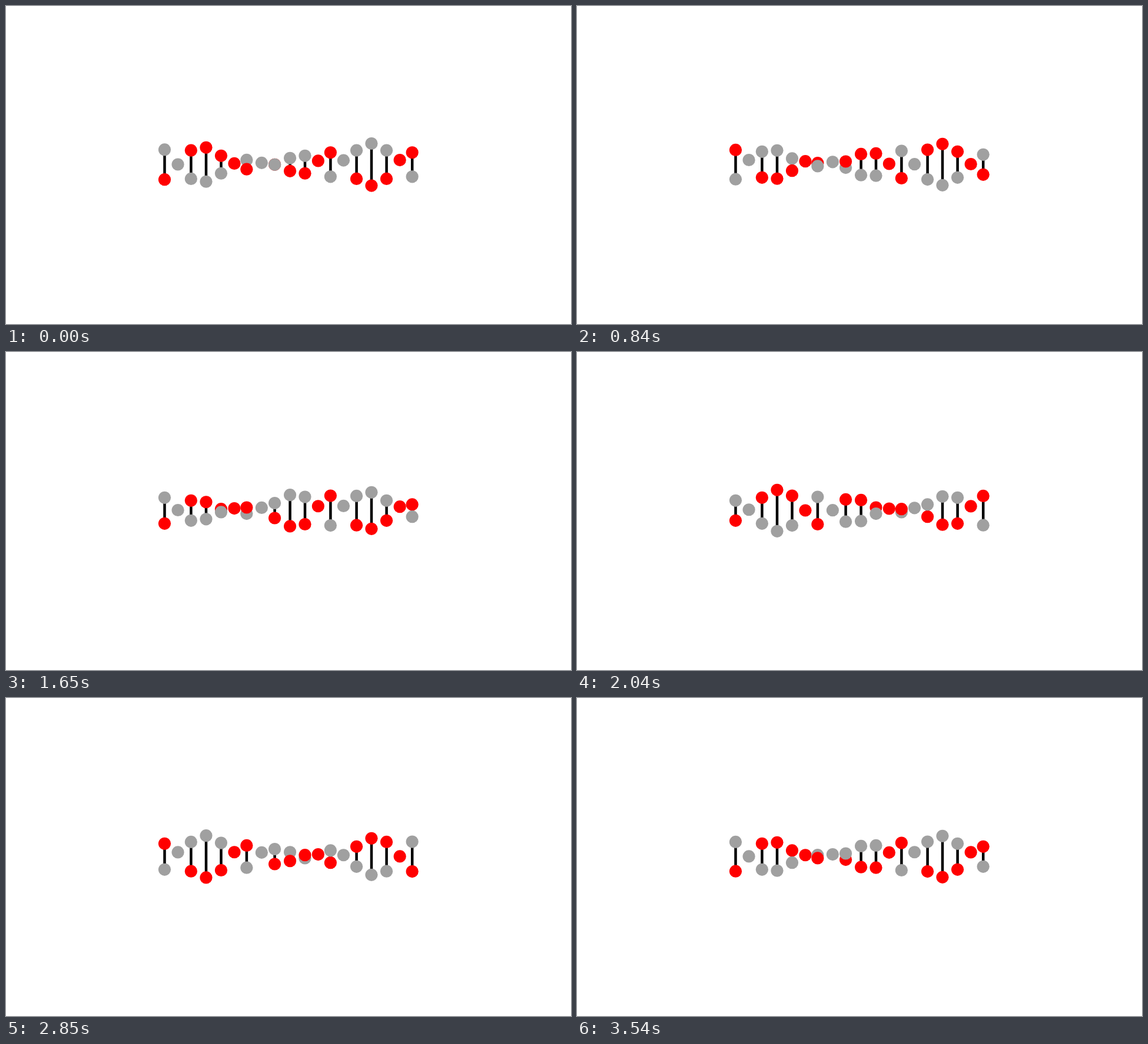
Write an HTML page with a canvas that moves like this. It is 960 px wide and 540 px high and loops after 3.57 s.

```html
<!DOCTYPE html>
<html lang="en">
<head>
<meta charset="utf-8">
<title>Helix</title>
<style>
  html, body { margin: 0; width: 100%; height: 100%; overflow: hidden; background: #fff; }
  canvas { display: block; }
</style>
</head>
<body>
<canvas width="960" height="540"></canvas>
<script>
const ctx = document.querySelector('canvas').getContext('2d');
const RED = '#f00', GRAY = '#a0a0a0';
const LOOP = 3570, STEP = 30, TURN = 1800;
const CENTER_Y = 269.3, RADIUS = 10.6;
const COLUMNS = [269.5, 292.1, 314.4, 340, 365.5, 388, 408.9, 434.4, 456.6, 482.6,
  508, 530.4, 551.4, 573.5, 595.6, 621, 646.6, 669.2, 690.2];

// Repeating run of six columns; lag counts tenths of a half turn.
const PATTERN = [
  { lag: 0, reach: -25.4 },
  { lag: 0, single: GRAY },
  { lag: 1, reach: 25.4 },
  { lag: 2, reach: 35.8 },
  { lag: 3, reach: 25.4 },
  { lag: 3, single: RED },
];

function dot(x, y, color) {
  ctx.fillStyle = color;
  ctx.beginPath();
  ctx.arc(x, y, RADIUS, 0, Math.PI * 2);
  ctx.fill();
}

function drawColumn(x, i, turn) {
  const { lag, reach, single } = PATTERN[i % 6];
  const angle = turn - (lag + 4 * Math.floor(i / 6)) * Math.PI / 10;
  if (single) {
    dot(x, 265.2 + 3.8 * Math.cos(angle), single);
    return;
  }
  const rise = reach * Math.cos(angle);
  ctx.fillStyle = '#000';
  ctx.fillRect(x - 2.25, CENTER_Y - Math.abs(rise), 4.5, 2 * Math.abs(rise));

  const dots = [[CENTER_Y + rise, GRAY], [CENTER_Y - rise, RED]];
  const redInFront = reach * Math.sin(angle) > 1e-6;
  if (!redInFront) dots.reverse();
  for (const [y, color] of dots) dot(x, y, color);
}

function draw() {
  const time = Math.floor(performance.now() % LOOP / STEP) * STEP;
  const turn = time / TURN * Math.PI * 2;
  ctx.clearRect(0, 0, 960, 540);
  COLUMNS.forEach((x, i) => drawColumn(x, i, turn));
  requestAnimationFrame(draw);
}
draw();
</script>
</body>
</html>
```
